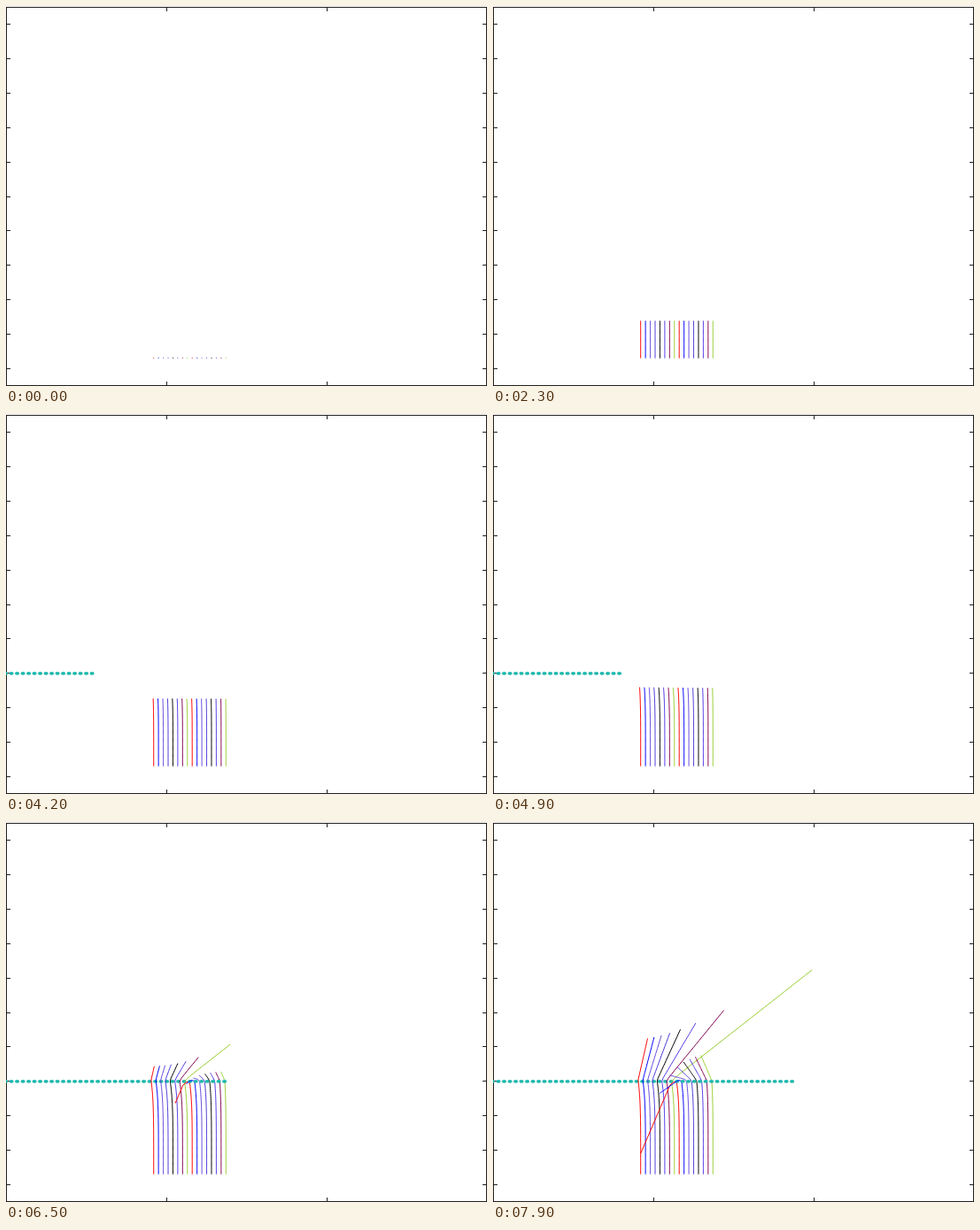
Recreate the animation shown at these times as an HTML page with a canvas. Size 543 by 429 pixels, loop 8000 ms.

```html
<!DOCTYPE html>
<html lang="en">
<head>
<meta charset="utf-8">
<title>Scattered particles</title>
<style>
html, body { margin: 0; width: 100%; height: 100%; overflow: hidden; background: #fff; }
canvas { display: block; }
</style>
</head>
<body>
<canvas id="stage" width="543" height="429"></canvas>
<script>
const ctx = document.getElementById('stage').getContext('2d');
const W = 543, H = 429, STEP = 100, STEPS = 80;
const COUNT = 16, HALF = COUNT / 2;
const BEND = 58, KICK = 58.4, FREE = 60, DOT_FROM = 27;
const colors = ['#ff0000', '#0000ff', '#6448dc', '#4838d8', '#000000', '#5038e8', '#800050', '#9acd32'];

// Upward beam that drifts left as it nears the dotted line
function beam(i, s) {
  const drift = i < HALF ? 2.8 + 0.08 * i : 3 - 0.25 * (i - HALF);
  const near = s / BEND;
  return [166.7 + 5.44 * i - drift * near ** 5,
          396.8 - 1.8 * s + 1.4 * (i / COUNT) * near ** 4];
}

// Straight flight, deflected more the nearer a particle is to the middle
function flight(i, s) {
  const left = i < HALF, d = left ? HALF - i : i - HALF + 1;
  const vx = left ? 7.64 / d ** 1.3 : -0.4 - 1.35 / d;
  const vy = -1.8 + (left ? -4.2 / d ** 1.08 : 5.87 / d ** 1.2);
  const x = beam(i, KICK)[0] + (left ? 1.5 : -4.5) / d;
  return [x + vx * (s - KICK), 290.6 + vy * (s - KICK)];
}

function hermite(a, b, ma, mb, u) {
  const u2 = u * u, u3 = u2 * u;
  return a * (2 * u3 - 3 * u2 + 1) + ma * (u3 - 2 * u2 + u)
       + b * (3 * u2 - 2 * u3) + mb * (u3 - u2);
}

function position(i, s) {
  if (s <= BEND) return beam(i, s);
  if (s >= FREE) return flight(i, s);
  const span = FREE - BEND, u = (s - BEND) / span;
  const a = beam(i, BEND), before = beam(i, BEND - 1);
  const b = flight(i, FREE), after = flight(i, FREE + 1);
  return [0, 1].map(k => hermite(a[k], b[k], (a[k] - before[k]) * span, (after[k] - b[k]) * span, u));
}

function trail(i, s) {
  ctx.strokeStyle = colors[i % colors.length];
  ctx.beginPath();
  ctx.moveTo(...position(i, Math.max(-0.5, s - 1)));
  ctx.lineTo(...position(i, s));
  ctx.stroke();
}

function axes() {
  ctx.fillStyle = '#202020';
  ctx.fillRect(0, 1, W, 1);
  ctx.fillRect(0, H - 1, W, 1);
  ctx.fillRect(0, 1, 1, H - 1);
  ctx.fillRect(W - 1, 1, 1, H - 1);
  for (const x of [181, 362]) {
    ctx.fillRect(x, 1, 1, 5);
    ctx.fillRect(x, H - 5, 1, 5);
  }
  for (let k = 0; k <= 10; k++) {
    const y = Math.round(20 + 38.9 * k);
    ctx.fillRect(0, y, 5, 1);
    ctx.fillRect(W - 5, y, 5, 1);
  }
}

function dot(s) {
  ctx.fillStyle = '#20b8ae';
  ctx.beginPath();
  ctx.ellipse(6.5 * (s - DOT_FROM) - 0.4, 292.9, 2.6, 1.8, 0, 0, Math.PI * 2);
  ctx.fill();
}

function draw(last) {
  ctx.fillStyle = '#fff';
  ctx.fillRect(0, 0, W, H);
  axes();
  ctx.lineWidth = 1;
  for (let s = 0; s <= last; s++) {
    for (let i = 0; i < COUNT; i++) trail(i, s);
    if (s >= DOT_FROM) dot(s);
  }
}

const begin = performance.now();
let shown = -1;
function tick() {
  const s = Math.floor((performance.now() - begin) / STEP) % STEPS;
  if (s !== shown) draw(shown = s);
  requestAnimationFrame(tick);
}
tick();
</script>
</body>
</html>
```
